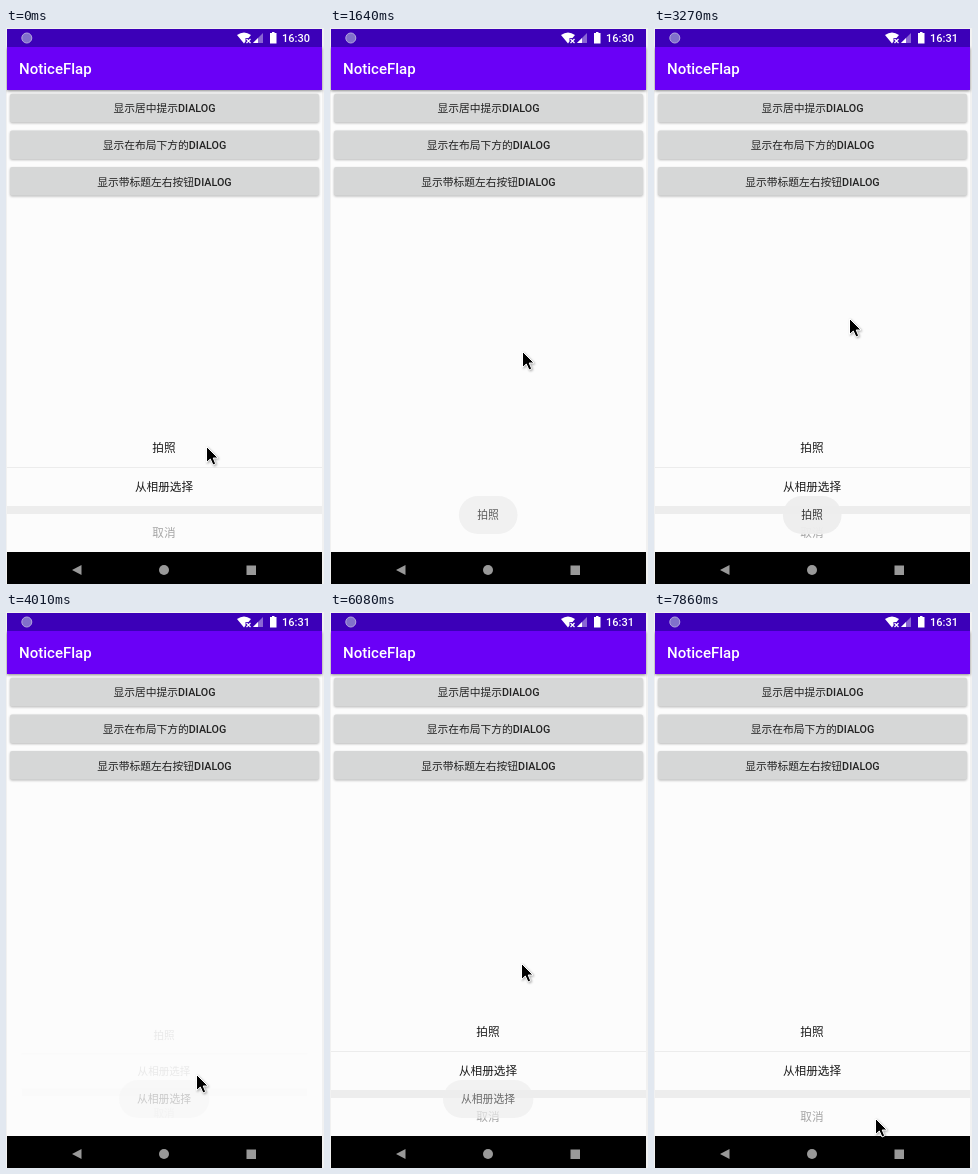
Write an HTML page that moves like this. It is 318 px wide and 556 px high and loops after 8 s.

```html
<!DOCTYPE html>
<html lang="zh-CN">
<head>
<meta charset="utf-8">
<style>
html, body { margin: 0; width: 100%; height: 100%; overflow: hidden; background: #f1f1f1; }
svg { display: block; width: 318px; height: 556px; font-family: Roboto, "Noto Sans CJK SC", "Noto Sans CJK", sans-serif; }
text { text-anchor: middle; }
.start { text-anchor: start; fill: #fff; font-weight: 500; }
.button rect { fill: #d6d7d7; filter: drop-shadow(0 1px 1px #0004); }
.button.raised rect { filter: drop-shadow(0 1px 2px #0005); }
.button text { font-size: 10.75px; fill: #222; }
.button tspan { font-weight: 500; }
#sheet { font-size: 11.65px; fill: #1c1c1c; transform-origin: 158px 462px; }
#toast { font-size: 10.8px; fill: #2a2a2a; }
#cursor { filter: drop-shadow(1px 1px 1px #0005); }
</style>
</head>
<body>
<svg viewBox="0 0 318 556">
  <defs><clipPath id="buttonClip"><rect x="4" y="102" width="309" height="29" rx="2"/></clipPath></defs>
  <rect x="1" y="1" width="315" height="555" fill="#fcfcfc"/>
  <rect x="1" y="19" width="315" height="43" fill="#6a00f7" style="filter:drop-shadow(0 1px 1.5px #0007)"/>
  <rect x="1" y="1" width="315" height="18" fill="#3c00b8"/>
  <text class="start" x="13" y="46" font-size="15">NoticeFlap</text>

  <circle cx="20.800" cy="10" r="5" fill="#8170cb" stroke="#b3a6df"/>
  <g fill="#fff">
    <path d="M231 7Q238 2 245 7L242.5 10H239.5V13.5L238 15.5Z"/>
    <path d="M240.5 11l4 4m0-4l-4 4" stroke="#fff" stroke-width="1.2"/>
    <path d="M257 5V15H247Z" opacity=".4"/>
    <path d="M252 10V15H247Z"/>
    <path d="M266 4H268.500V5H270.500V15.500H264V5H266Z"/>
  </g>
  <text class="start" id="clock" x="276" y="14" font-size="11"></text>

  <g id="buttons"></g>
  <g id="press" clip-path="url(#buttonClip)">
    <rect x="4" y="102" width="309" height="29" opacity=".065"/>
    <circle cx="193" cy="118" r="32" opacity=".035"/>
  </g>

  <g id="sheet">
    <rect x="1" y="401" width="315" height="123" fill="#fcfcfc"/>
    <path d="M1 439.500H316" stroke="#ececec"/>
    <rect x="1" y="478" width="315" height="8" fill="#ededed"/>
    <text x="158" y="424">拍照</text>
    <text x="158" y="463">从相册选择</text>
    <text x="158" y="509" fill="#a6a6a6">取消</text>
  </g>

  <g id="toast">
    <rect y="468" height="38" rx="19" fill="#eee"/>
    <text x="158" y="491"></text>
  </g>

  <rect x="1" y="524" width="315" height="32"/>
  <g fill="#999">
    <path d="M66 542L75.500 537V547Z"/>
    <circle cx="158" cy="542" r="5"/>
    <rect x="240.500" y="537.500" width="9.500" height="9.500"/>
  </g>
  <path id="cursor" d="M-.5 -.5V15.500L3.300 12 6 18 8.700 16.800 6.200 11H11Z" stroke="#fff"/>
</svg>
<script>
const $ = id => document.getElementById(id);
const LOOP = 8000, STEP = LOOP / 54;

// Moments in ms: an item is chosen, the sheet is opened.
const choices = [1170, 3862];
const opens = [2703, 4925];
const CLOCK_CHANGE = 2360;

// Pointer moves after the starting point: begin, end, x, y.
const home = [201, 419];
const moves = [
  [0, 440, 177, 419], [1050, 1620, 193, 324], [1620, 2220, 200, 119],
  [2820, 3700, 191, 463], [4000, 4590, 203, 108], [5180, 5480, 192, 352],
  [6070, 6510, 193, 245], [6660, 6960, 122, 330], [7110, 7850, 222, 507]
];

const ramp = (t, begin, length) => Math.min(1, Math.max(0, (t - begin) / length));
const smooth = k => k * k * (3 - 2 * k);
const sum = (list, f) => list.reduce((total, item) => total + f(item), 0);

const sheetAt = t => 1 + sum(opens, o => ramp(t, o, 150)) - sum(choices, c => ramp(t, c, 150));
const toastAt = t => sum(choices, c => ramp(t, c, 600) - ramp(t, c + 2070, 450));
const pressAt = t => sum(opens, o => ramp(t, o, 100) - ramp(t, o + 120, 250));
const cursorAt = t => moves.reduce(([x, y], [begin, end, toX, toY]) => {
  const k = smooth(ramp(t, begin, end - begin));
  return [x + (toX - x) * k, y + (toY - y) * k];
}, home);

$('buttons').innerHTML = ['显示居中提示', '显示在布局下方的', '显示带标题左右按钮'].map((label, i) =>
  `<g class="button"><rect x="4" y="${65.7 + 36.7 * i}" width="309" height="28.5" rx="2"/>
    <text x="158.5" y="${84 + 37 * i}">${label}<tspan>DIALOG</tspan></text></g>`
).join('');
const middleButton = $('buttons').children[1];
const [toastBox, toastText] = $('toast').children;

function draw(now) {
  const t = Math.floor(now % LOOP / STEP) * STEP;
  const [x, y] = cursorAt(t).map(Math.round);
  const sheet = sheetAt(t);
  const message = t < choices[1] - STEP ? '拍照' : '从相册选择';
  const toastWidth = message.length * 10.6 + 37.5;

  $('clock').textContent = t < CLOCK_CHANGE ? '16:30' : '16:31';
  $('cursor').setAttribute('transform', `translate(${x} ${y})`);
  $('sheet').style.opacity = sheet;
  $('sheet').style.transform = `scale(${.9 + .1 * sheet})`;
  $('press').style.opacity = pressAt(t);
  middleButton.classList.toggle('raised', opens.some(o => t > o - 60 && t < o + 370));
  $('toast').style.opacity = toastAt(t);
  toastBox.setAttribute('x', 158.2 - toastWidth / 2);
  toastBox.setAttribute('width', toastWidth);
  toastText.textContent = message;
  requestAnimationFrame(() => draw(performance.now() - start));
}
const start = performance.now();
draw(0);
</script>
</body>
</html>
```
